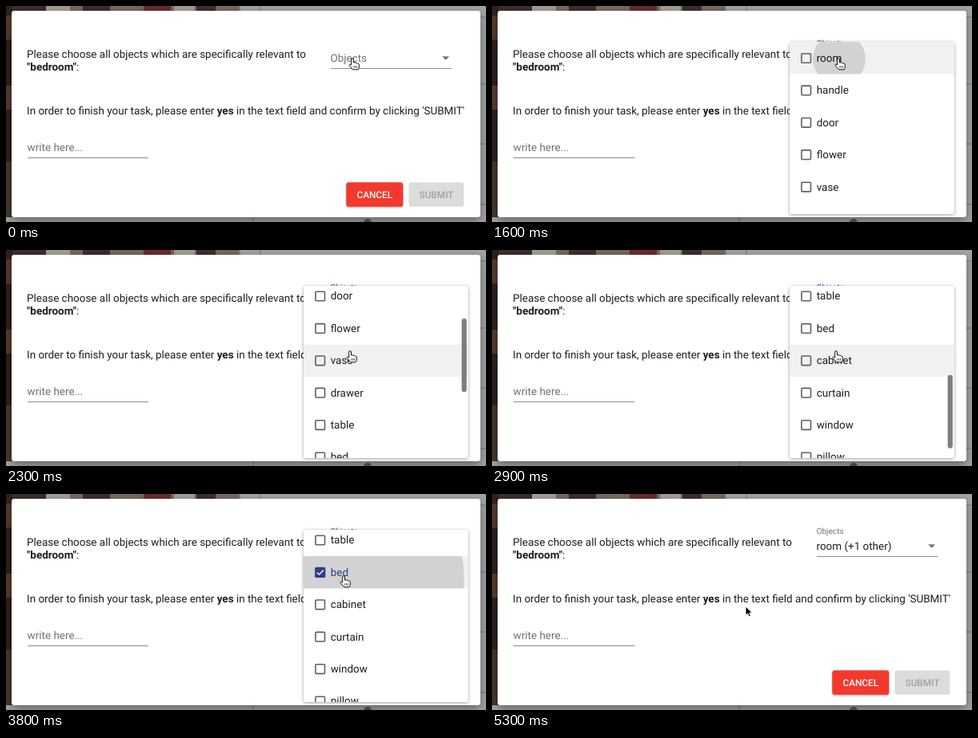
Write an HTML page that moves like this. It is 600 px wide and 271 px high and loops after 5.4 s.

```html
<!DOCTYPE html>
<html lang="en">
<head>
<meta charset="utf-8">
<style>
  html, body { margin: 0; width: 100%; height: 100%; overflow: hidden; background: #a3a3a3; }
  body > svg { display: block; width: 100%; height: 100%; }
  text { font: 13.46px Roboto, Arial, sans-serif; fill: #1e1e1e; text-rendering: geometricPrecision; white-space: pre; }
  .bold { font-weight: 700; }
  .hint { fill: #727272; }
  .button { font-size: 11.8px; font-weight: 500; }
  .line { stroke: #8e8e8e; stroke-width: 1; }
  #dialog { filter: drop-shadow(0 4px 6px rgba(0,0,0,.4)); }
  #paper { filter: drop-shadow(0 1.5px 2px rgba(0,0,0,.38)); }
  #cancel { filter: drop-shadow(0 1.5px 1.2px rgba(0,0,0,.35)); }
</style>
</head>
<body>
<svg viewBox="0 0 600 271" preserveAspectRatio="none">
  <!-- dimmed page -->
  <rect width="600" height="271" fill="#a3a3a3"/>
  <path d="M0 0H292V8H0Z" fill="#75695f"/>
  <path d="M0 0H50V8H0ZM96 0H130V8H96ZM238 0H262V8H238Z" fill="#3c302b"/>
  <path d="M172 0H206V8H172Z" fill="#682c2b"/>
  <path d="M50 0H80V8H50ZM210 0H236V8H210Z" fill="#a39d95"/>
  <path d="M0 0H8V265H0Z" fill="#30201b"/>
  <path d="M0 12H8V42H0ZM0 100H8V130H0Z" fill="#5a3a2d"/>
  <path d="M0 195H8V265H0Z" fill="#46392a"/>
  <path d="M292 0V6M309 265V271M318 0V6M592 14H600M592 98H600M592 173H600M592 249H600" stroke="#858585" stroke-width="1.5"/>
  <circle cx="452" cy="272" r="5" fill="#555"/>

  <rect id="dialog" x="7" y="6" width="586" height="259" rx="3.4" fill="#fff"/>
  <text x="26" y="65">Please choose all objects which are specifically relevant to</text>
  <text x="26" y="81" class="bold">"bedroom"<tspan font-weight="400">:</tspan></text>
  <text x="26" y="136">In order to finish your task, please enter <tspan class="bold">yes</tspan> in the text field and confirm by clicking 'SUBMIT'</text>
  <text x="26.6" y="182" class="hint">write here...</text>
  <path class="line" d="M27 190.5H178M406 78.5H557"/>
  <path d="M545.2 63.3H554L549.6 67.8Z" fill="#707070"/>
  <text id="label" class="hint">Objects</text>
  <text id="value" x="405.5" y="70">room (+1 other)</text>

  <rect id="cancel" x="425.3" y="221.3" width="71" height="30.5" rx="3.4" fill="#f3392d"/>
  <text x="460.8" y="241" class="button" text-anchor="middle" style="fill:#fff">CANCEL</text>
  <rect x="503.4" y="221.3" width="69" height="30.5" rx="3.4" fill="#dcdcdc"/>
  <text x="538" y="241" class="button" text-anchor="middle" style="fill:#a2a2a2">SUBMIT</text>

  <g id="menu">
    <rect id="paper" x="372" y="45" width="205.7" height="216" rx="3" fill="#fff"/>
    <svg x="372" y="45" width="205.7" height="216">
      <g id="list"></g>
      <rect id="thumb" x="197.6" width="6.2" height="92" rx="3.1" fill="#7d7d7d"/>
    </svg>
  </g>

  <g id="cursor" stroke-linejoin="round">
    <g id="hand" stroke="#111">
      <path fill="#fff" d="M-1.3 8V1A1.4 1.4 0 0 1 1.5 1V5Q3.5 4.2 4.1 5.5 6 4.9 6.6 6.2 8.4 5.9 8.4 7.7V10Q8.4 12 7 13.8H.8Q-2 11-4 8.2-3.8 6-1.3 8Z"/>
      <path d="M1.8 9V11.8M3.7 9V11.8M5.6 9V11.8" stroke-width=".7"/>
    </g>
    <path id="arrow" d="M0 0V11.4L2.6 9 4.3 13 6.4 12.1 4.7 8.2H8.2Z" stroke="#fff" stroke-width="1"/>
  </g>
</svg>

<script>
const LOOP = 5400, STEP = 100;
const ROW = 40.4, MENU_X = 372, MENU_Y = 45.2;
const OPEN = 480, CLOSE = 5130;
const INDIGO = '#3545a3';
const names = ['room', 'handle', 'door', 'flower', 'vase', 'drawer',
  'table', 'bed', 'cabinet', 'curtain', 'window', 'pillow'];
// option index: press time, check time, ripple centre in the row, final radius
const clicks = {
  0: { press: 1569, check: 1660, x: 62, y: 21, radius: 145 },
  7: { press: 3470, check: 3590, x: 50, y: 27, radius: 157 },
};
const pointerPath = [[1800, 433, 66], [2200, 430, 127], [3000, 430, 127], [3300, 422, 103],
  [4000, 422, 103], [4200, 385, 150], [4350, 335, 172], [4500, 312, 165],
  [4700, 315, 141], [4900, 315, 141], [5100, 317, 141]];
const scrollPath = [[2150, 0], [2200, 22], [2300, 88.3], [2400, 160], [2500, 212], [2600, 240], [2700, 249.9]];

const $ = id => document.getElementById(id);
const set = (el, attrs) => { for (const k in attrs) el.setAttribute(k, attrs[k]); };
const clamp = v => Math.max(0, Math.min(1, v));
const progress = (t, start, duration) => clamp((t - start) / duration);
const mix = (a, b, p) => a + (b - a) * p;

function follow(path, t) {
  const i = path.findIndex(key => key[0] > t);
  if (i === 0) return path[0].slice(1);
  if (i < 0) return path.at(-1).slice(1);
  const [a, b] = [path[i - 1], path[i]];
  return a.slice(1).map((v, k) => mix(v, b[k + 1], (t - a[0]) / (b[0] - a[0])));
}

// cubic-bezier(0, 0, .2, 1)
function easeOut(x) {
  let lo = 0, hi = 1, s;
  for (let i = 0; i < 20; i++) {
    s = (lo + hi) / 2;
    if (.6 * (1 - s) * s * s + s ** 3 < x) lo = s; else hi = s;
  }
  return 3 * (1 - s) * s * s + s ** 3;
}

$('list').innerHTML = names.map((name, i) => `
  <svg y="${i * ROW + .2}" width="205.7" height="${ROW}">
    <rect class="bg" width="206" height="${ROW}" fill="#f1f1f1"/>
    <rect class="box" x="14.9" y="14.5" width="11.6" height="11.6" rx="1" stroke-width="1.6"/>
    <path class="tick" d="M16.7 20.4L19.4 23 24.8 17.5" fill="none" stroke="#fff" stroke-width="1.7"/>
    <text x="33.7" y="24.8">${name}</text>
    <circle class="ripple" fill="#000"/>
  </svg>`).join('');
const rows = [...$('list').children].map(row => {
  const part = sel => row.querySelector(sel);
  return { bg: part('.bg'), box: part('.box'), tick: part('.tick'), text: part('text'), ripple: part('.ripple') };
});

function drawRow(row, i, t, hovered, active) {
  const click = clicks[i];
  const checked = click && t >= click.check;
  set(row.bg, { opacity: +(i === hovered || i === active) });
  set(row.box, { fill: checked ? INDIGO : '#fff', 'fill-opacity': +!!checked, stroke: checked ? INDIGO : '#606060' });
  set(row.tick, { opacity: +!!checked });
  row.text.style.fill = checked ? INDIGO : '';
  if (!click) return;
  set(row.ripple, {
    cx: click.x, cy: click.y,
    r: click.radius * easeOut(progress(t, click.press, 450)),
    opacity: .13 * (1 - progress(t, click.press + 450, 400)),
  });
}

function draw(t) {
  const [x, y] = follow(pointerPath, t);
  const [scroll] = follow(scrollPath, t);
  const overMenu = x >= MENU_X;
  const hovered = overMenu ? Math.floor((y - MENU_Y + scroll) / ROW) : -1;
  const active = t >= clicks[7].press ? 7 : t < 2300 ? 0 : -1;
  rows.forEach((row, i) => drawRow(row, i, t, hovered, active));

  const opening = easeOut(progress(t, OPEN, 120));
  const scale = mix(.8, 1, opening);
  set($('menu'), {
    opacity: progress(t, OPEN, 120) * (1 - progress(t, CLOSE + 25, 100)),
    transform: `translate(0 ${45 * (1 - scale)}) scale(1 ${scale})`,
  });
  set($('list'), { transform: `translate(0 ${-scroll})` });
  set($('thumb'), { y: 2.4 + .438 * scroll, opacity: progress(t, 2150, 50) * (1 - progress(t, 3200, 250)) });

  const float = easeOut(progress(t, OPEN, 600));
  set($('label'), {
    transform: `translate(405.5 ${mix(70, 49.6, float)}) scale(${mix(1, .75, float)})`,
  });
  $('label').style.fill = t >= OPEN && t < CLOSE ? '#3f51b5' : '';
  set($('value'), { opacity: +(t >= CLOSE) });

  set($('cursor'), { transform: `translate(${x} ${y})` });
  set($('hand'), { opacity: +overMenu });
  set($('arrow'), { opacity: +!overMenu });
}

const start = performance.now();
function frame() {
  const t = (performance.now() - start) % LOOP;
  draw(Math.floor(t / STEP) * STEP);
  requestAnimationFrame(frame);
}
frame();
</script>
</body>
</html>
```
